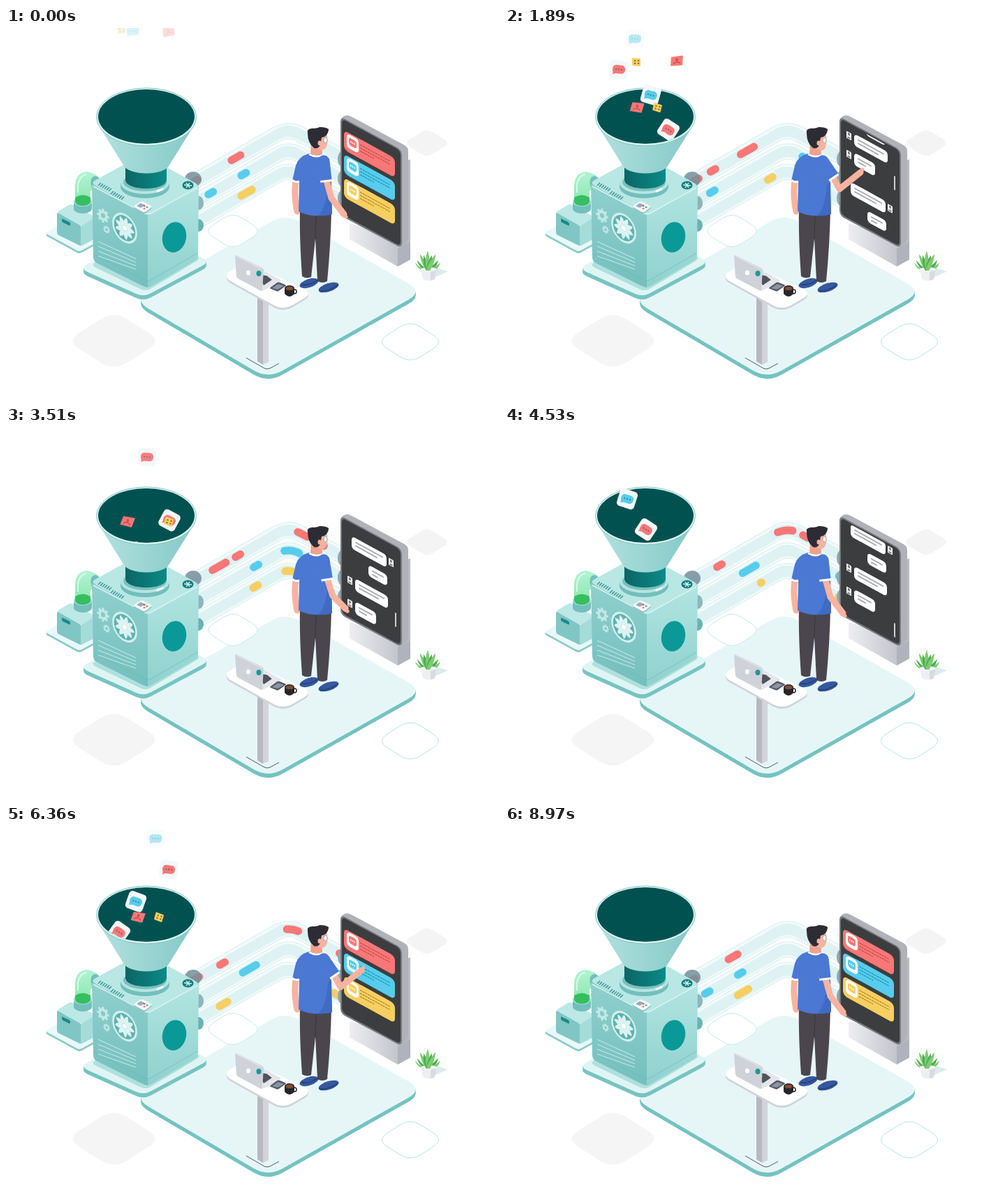
Recreate the animation shown at these times as an HTML page. Size 706 by 532 pixels, loop 9 s.

```html
<!DOCTYPE html>
<html lang="en">
<head>
<meta charset="utf-8">
<title>Message machine</title>
<style>
html, body { margin: 0; width: 100%; height: 100%; overflow: hidden; background: #fff; }
svg { display: block; width: 100vw; height: 100vh; }
</style>
</head>
<body>
<svg id="stage" viewBox="0 0 706 532" fill="none"></svg>
<script>
const LOOP = 9;
const RED = '#f97776', BLUE = '#56cdec', YELLOW = '#f6cf60', SKIN = '#f7b3a0', SHIRT = '#4a78d3';

// ---------- shape helpers ----------
const points = s => s.split(' ').map(p => p.split(',').map(Number));

function rounded(pts, r) {
  const toward = (a, b) => {
    const d = Math.hypot(b[0] - a[0], b[1] - a[1]), k = Math.min(r, d / 2) / d;
    return [a[0] + (b[0] - a[0]) * k, a[1] + (b[1] - a[1]) * k].map(n => n.toFixed(1));
  };
  const n = pts.length;
  return pts.map((p, i) =>
    `${i ? 'L' : 'M'}${toward(p, pts[(i + n - 1) % n])}Q${p} ${toward(p, pts[(i + 1) % n])}`).join('') + 'Z';
}
const path = (d, fill, more = '') => `<path d="${d}" fill="${fill}" ${more}/>`;
const line = (d, color, width, more = '') => path(d, 'none', `stroke="${color}" stroke-width="${width}" ${more}`);
const poly = (s, fill, r = 1, more) => path(rounded(points(s), r), fill, more);
const oval = (x, y, rx, ry, fill, more = '') =>
  `<ellipse cx="${x}" cy="${y}" rx="${rx}" ry="${ry}" fill="${fill}" ${more}/>`;
const rect = (x, y, w, h, r, fill) =>
  `<rect x="${x}" y="${y}" width="${w}" height="${h}" rx="${r}" fill="${fill}"/>`;
const tile = (x, y, w, h, r, fill, more) =>
  poly(`${x - w},${y} ${x},${y - h} ${x + w},${y} ${x},${y + h}`, fill, r, more);
const group = (inner, more = '') => `<g ${more}>${inner}</g>`;
const repeat = (n, f) => Array.from({ length: n }, (_, i) => f(i)).join('');
const slab = (s, r, h, top, side) =>
  repeat(h, i => poly(s, side, r, `transform="translate(0 ${h - i})"`)) + poly(s, top, r);
const gradient = (id, from, to, dir = 'x2="1" y2="0"') =>
  `<linearGradient id="${id}" ${dir}><stop stop-color="${from}"/><stop offset="1" stop-color="${to}"/></linearGradient>`;

// ---------- static scenery ----------
const defs = `<defs>
  ${gradient('cone', '#b2e1de', '#84c9c7')}
  ${gradient('left', '#8fd0cd', '#74bfbd', 'x2="0" y2="1"')}
  ${gradient('right', '#b2e5e1', '#8fd1ce', 'x2="0" y2="1"')}
  ${gradient('glass', '#a9f3cf', '#7ee2a2', 'x2="0" y2="1"')}
  ${gradient('stand', '#eeeef1', '#b9bbc3')}
  ${gradient('neck', '#0b6564', '#0b8a87')}
  <clipPath id="mouth"><path d="M100-20H310V127H270A69 39 0 0 1 132 127H100Z"/></clipPath>
  <clipPath id="panel"><rect x="1" y="1" width="81" height="129" rx="6"/></clipPath>
</defs>`;

const ground =
  tile(154.5, 448.5, 68, 43, 22, '#f5f5f5') + tile(603, 165, 33, 21, 10, '#f4f4f4') +
  slab('183,390 400,266 597,378 375,503', 24, 6, '#e6f6f7', '#74c3c0') +
  tile(325, 291, 42, 27, 16, '#fff', 'stroke="#c5eae9"') +
  tile(579, 450, 48, 31, 18, '#fff', 'stroke="#b4e6e1"');

const pipePaths = [
  'M265 223L385 154Q403 143 421 152L486 187',
  'M265 253L388 182Q402 173.500 417 179.500L486 218',
  'M265 282L388 211Q403 202.500 418 210L486 249'];
const pipes = pipePaths.map(d =>
  line(d, '#d9f0f1', 23) + line(d, '#f1fafa', 21) + line(d, '#def2f3', 16) +
  line(d, '#f6fcfc', 1.5, 'transform="translate(0 -9)"')).join('');
const mouths = oval(268, 217, 12, 11, '#758e9b', 'opacity=".85"') +
  oval(276, 251, 7, 10, '#8eb5bb') + oval(276, 283, 7, 9, '#68b3b2') +
  [188, 216, 244].map(y => oval(481, y, 6, 11, '#8fa9b2')).join('');

const gear = (x, y, r) => group(
  `<circle r="${r * .62}" stroke="#c1e9e6" stroke-width="${r * .45}"/>` +
  repeat(8, i => `<path d="M0 ${-r * .7}V${-r * 1.1}" stroke="#c1e9e6" stroke-width="${r * .38}" transform="rotate(${i * 45})"/>`),
  `transform="matrix(.87 .3 0 1 ${x} ${y})"`);

const sideBox =
  slab('56,294 92,273 143,300 105,321', 4, 3, '#e9f8f8', '#8acac8') +
  poly('73,264 108,284 108,313 73,296', '#80c6c4', 3) +
  poly('107,284 126,272 126,303 107,313', '#a3dcd8', 2) +
  poly('73,264 93,252 128,271 108,284', '#bce8e5', 3) +
  poly('80,273 92,279 92,284 80,278', '#1a8a88', 2) +
  path('M97 248V259A13 7 0 0 0 123 259V248Z', '#72bfbc') + oval(110, 249, 13, 7, '#a5ddda') +
  path('M99 248V226Q100 207 116 206Q127 207 137 218L126 235Q121 230 121 236V248A11 6 0 0 1 99 248Z', 'url(#glass)', 'opacity=".9"') +
  path('M99 243Q110 236 121 243V249A11 6 0 0 1 99 249Z', '#35bf60') +
  line('M103 236V225Q105 212 115 210', '#e4fcf0', 2, 'opacity=".8"') +
  oval(130, 225, 8, 13, '#74bebc', 'transform="rotate(-18 130 225)"');

const machine =
  slab('106,345 200,291 292,335 197,386', 12, 6, '#dff5f4', '#77c4c1') +
  poly('121,340 200,295 280,330 200,378', '#aee0dd', 8) +
  path('M123 224L204 265V372Q200 372 194 369L130 337Q125 334 125 329Z', 'url(#left)') +
  path('M203 265L276 225L275 326Q275 331 270 334L210 369Q206 372 203 371Z', 'url(#right)') +
  poly('121,222 196,181 278,226 204,269', '#b9e7e4', 8) +
  line('M125 227L199 266Q204 268 209 265L274 229', '#d9f3f1', 1.5) +
  line('M126 324L200 362Q204 364 208 361L274 323', '#6cbab8', 1, 'opacity=".7"') +
  repeat(4, i => line(`M132 ${306 + i * 7}L186 ${331 + i * 5}`, '#bfe6e4', 1.2)) +
  [[132, 226], [150, 238]].map(([x, y]) =>
    repeat(6, i => line(`M${x + i * 3} ${y + i * 1.6}l4 -4`, '#3a9694', 1.5))).join('') +
  gear(139, 269, 9) + gear(144, 289, 5) +
  slab('182,256 194,248 210,256 198,265', 3, 2, '#f5f8fa', '#95bec4') +
  poly('187,255 193,251 199,254 193,258', '#95aebc') +
  oval(198, 259, 1.5, 1.2, RED) + oval(202, 257, 1.5, 1.2, '#40bd76') + oval(198, 255, 1.5, 1.2, '#ef5258') +
  oval(260.500, 225.500, 8, 6, '#167f7f') + line('M255 225l11 1M258 222l5 7M263 222l-5 7', '#d2efed', 1.3) +
  oval(241, 300, 17, 22, '#0a9997', 'transform="rotate(12 241 300)"');

const hopper =
  path('M164 222V228A35 16 0 0 0 234 228V222Z', '#73bfbd') + oval(199, 222, 35, 16, '#b6e4e1') +
  oval(199, 221, 31, 13, '#79c0be') + path('M171 195V218A29 12 0 0 0 230 218V195Z', 'url(#neck)') +
  line('M217 234l7 -3', '#eefafa', 3, 'stroke-linecap="round"') +
  path('M131 137L169 198A33 14 0 0 0 233 198L271 137Z', 'url(#cone)') +
  oval(201, 127.500, 71.500, 41.500, '#d8f1ef', 'stroke="#73bebb" stroke-width=".8"') +
  oval(201, 127, 69, 39, '#025151');

const kiosk =
  poly('492,280 566,300 567,195 579,188 579,332 561,342 492,303', 'url(#stand)') +
  poly('561,316 579,306 579,332 561,342', '#b1b3bc') +
  poly('479,129 489,124 576,171 576,306 566,314 500,260', '#b0b2b8', 6) +
  poly('479,127 567,175 567,316 479,269', '#77797f', 8) +
  poly('481,130 565,176 565,313 481,267', '#3c3d3f', 7);

const manBody =
  oval(434, 366, 14, 6, '#35589e', 'transform="rotate(-18 434 366)"') +
  oval(462, 372, 15, 6, '#35589e', 'transform="rotate(-18 462 372)"') +
  line('M423 368q12 2 24 -7M449 377q14 1 27 -9', '#233c78', 1.5) +
  path('M421 258Q420 300 424 356Q430 360 437 357L443 302L446 363Q453 367 460 363Q465 310 466 262Z', '#4b464e') +
  line('M443 303L444 270', '#39353d', 1) +
  line('M416 216Q411 235 417 263', SKIN, 9, 'stroke-linecap="round"') +
  path('M434 180Q419 184 415 197L410 219Q414 223 420 221L419 263Q441 274 467 266L465 215Q466 190 453 181Z', SHIRT) +
  path('M447 269Q459 258 461 225L466 220L467 267Q458 270 447 269Z', '#3f6bc3') +
  line('M410 218Q414 222 420 220', '#fff', 3) +
  path('M437 164H452L453 181Q444 186 436 181Z', '#eea18f') +
  line('M434 181Q444 187 454 182', '#fff', 2.5) +
  path('M446 150H459Q462 162 459 170Q455 178 446 173Z', SKIN) +
  path('M432 151Q430 145 438 144Q446 144 449 142Q458 142 462 145Q462 152 456 156L452 157L450 168Q447 174 441 172Q432 165 432 151Z', '#2d2c34') +
  oval(449, 165, 2.5, 3.5, SKIN) + oval(457.500, 161, 2.500, 4, '#fff', 'stroke="#8c91a6" stroke-width=".8"');

const table =
  line('M344 473L370 488Q374 490 378 488L391 481', '#55595f', 1) +
  poly('360,386 368,390 368,483 360,478', '#b7b8c0', 0.5) + poly('368,386 376,386 376,479 368,483', '#d3d4d9', 0.5) +
  slab('309,356 343,336 440,380 397,405', 16, 3, '#fff', '#d0d3d9') +
  poly('338,358 366,346 395,362 368,377', '#e4e6eb', 2) + poly('361,354 373,355 381,361 369,369', '#50545c') +
  poly('328,325 369,345 367,378 330,358', '#cfd2d8', 3) + line('M330 327L367 346', '#eceef1', 1) +
  oval(347, 351, 3, 3.5, '#fff') + oval(362, 352, 3.5, 4, '#159b99') +
  poly('377,373 390,364 402,369 389,378', '#555c68', 2) + poly('381,373 390,367 398,370 389,375', '#8c93a1') +
  oval(413, 378, 3, 3, 'none', 'stroke="#25262a" stroke-width="1.5"') +
  path('M399 373V381Q406 389 413 381V373Z', '#25262a') + oval(406, 373, 7, 4, '#33343a') + oval(406, 373.500, 5, 2.5, '#8b4c2a');

const leaf = i => {
  const a = (i - 4) * .29, x = 604 + Math.sin(a) * 20, y = 347 - Math.cos(a) * (i % 2 ? 22 : 27);
  return path(`M602 348Q${(600 + x) / 2 - 3} ${y + 12} ${x} ${y}Q${(608 + x) / 2 + 2} ${y + 14} 607 348Z`, i % 2 ? '#4cae55' : '#7fcb70');
};
const plant = path('M606 361L633 349L617 344Z', '#dcebeb') + repeat(9, leaf) +
  path('M594 346L597 360Q606 365 614 360L617 346Z', '#eeeff2') + path('M608 348L608 362Q612 362 614 360L617 346Z', '#d9dbe2') +
  oval(605.500, 346, 11.500, 3, '#f8f8fa') + repeat(5, i => leaf(i + 2));

// ---------- touch screen ----------
const menuCard = (color, ink, v) =>
  rect(3, v, 73, 28, 6, color) + rect(7, v + 2, 17, 20, 5, '#fff') +
  rect(10, v + 6, 11, 11, 3, color) + line(`M12 ${v + 11.500}h7`, '#fff', 2, 'stroke-dasharray="1.500 1.200"') +
  [43, 43, 20].map((w, i) => line(`M26 ${v + 8 + i * 4.500}h${w}`, ink, 1.4, 'stroke-dasharray="3 .6"')).join('');
const menu = menuCard(RED, '#c14e50', 14) + menuCard(BLUE, '#2893b3', 48) + menuCard(YELLOW, '#b68b2b', 82);

const bubble = (u, v, w, h, avatar) =>
  rect(u, v, w, h, 5, '#fff') +
  [w - 12, w - 20].map((n, i) => line(`M${u + 6} ${v + 6 + i * 5}h${n}`, '#a7a7aa', 2, 'stroke-linecap="round"')).join('') +
  (avatar ? rect(avatar, v + 2, 7, 10, 1, '#f2f2f2') + oval(avatar + 3.500, v + 5, 1.500, 2, '#77777b') +
    line(`M${avatar + 1.500} ${v + 10}h4`, '#77777b', 2) : '');
const chat = bubble(36, -11, 28, 14) + bubble(19, 10, 48, 17, 8) + bubble(19, 37, 30, 18, 8) +
  bubble(14, 82, 50, 18, 67) + bubble(38, 110, 27, 16) + bubble(19, 140, 47, 18, 8) + bubble(19, 173, 30, 18, 8);

// ---------- moving parts ----------
// entry time in seconds, dash length
const flows = [
  { color: RED, speed: 107, lead: 3.5, pills: [[1.04, 22], [1.57, 8], [1.86, 15], [2.82, 8], [3.11, 22], [4.11, 8], [4.85, 17], [5.91, 8], [6.37, 22], [8.34, 15], [8.97, 8]] },
  { color: BLUE, speed: 136, lead: 8, pills: [[.53, 22], [1.68, 8], [2.36, 22], [2.78, 8], [3.87, 22], [4.9, 8], [5.71, 22], [6.65, 22], [7.04, 8], [8.42, 8], [8.82, 8]] },
  { color: YELLOW, speed: 136, lead: 12.7, pills: [[.12, 1.5], [1.01, 8], [2.42, 13], [2.82, 8], [3.76, 1.5], [4.7, 13], [6.06, 13], [6.84, 8], [7.13, 8], [8.42, 18]] }];

// kind, colour, x, time at the top edge, optional speed and sideways drift
const drops = [
  ['card', BLUE, 182, -.04, 102, -7], ['chip', YELLOW, 165, -.02], ['chip', RED, 233, -.04],
  ['card', RED, 234, .46], ['card', BLUE, 215, .88, 95, -7], ['chip', RED, 189, 1], ['chip', YELLOW, 218, 1],
  ['card', RED, 163, 1.31], ['chip', YELLOW, 188, 1.51], ['chip', RED, 246, 1.52],
  ['card', BLUE, 186, 1.74], ['card', RED, 234, 2.2], ['chip', YELLOW, 233, 2.45], ['chip', RED, 174, 2.45],
  ['card', RED, 202, 3.09], ['card', BLUE, 175, 3.52],
  ['card', RED, 162, 4.87], ['card', BLUE, 186, 5.3], ['chip', RED, 189, 5.34], ['chip', YELLOW, 219, 5.34],
  ['card', RED, 233, 5.75], ['card', BLUE, 215, 6.14, 81, -4], ['chip', YELLOW, 188, 6.46], ['chip', RED, 246, 6.46],
  ['card', RED, 235, 6.73], ['card', RED, 233, 7.14], ['card', BLUE, 213, 7.11], ['chip', YELLOW, 164, 7.4], ['chip', RED, 233, 7.4]];
const dropShape = {
  card: c => rect(-13, -13, 26, 26, 5, '#f4f8fa') + rect(-9, -6, 18, 12, 5, c) + path('M-8 2v6l6 -3Z', c) +
    [-4, 0, 4].map(x => oval(x, 0, 1.1, 1.1, '#31566a', 'opacity=".65"')).join(''),
  chip: c => c === RED
    ? poly('-8,-6 9,-8 8,6 -9,7', c, 1) + oval(0, -2, 2, 2, '#c94f55') + line('M-5 4Q0 -1 5 3', '#c94f55', 1.5)
    : poly('-6,-6 6,-5 6,6 -6,5', c, 1) + line('M-3 -2h2M2 -2h2M-3 2h2M2 2h2', '#80651f', 2)
};

const stage = document.getElementById('stage');
stage.innerHTML = defs + ground + pipes +
  flows.map((f, i) => f.pills.map(() => line(pipePaths[i], f.color, 11, 'class="pill" stroke-linecap="round"')).join('')).join('') +
  mouths + sideBox + machine +
  group(`<circle r="19" fill="#5fb3b1" stroke="#d3efed" stroke-width="3"/>` +
    group(repeat(9, i => `<path d="M0 -3Q8 -7 3 -16Q-2 -13 -3 -5Z" fill="#dcf3f2" transform="rotate(${i * 40})"/>`) +
      `<circle r="3.5" fill="#fff"/>`, 'id="fan"'), 'transform="matrix(.87 .4 0 1 170 287)"') +
  hopper +
  group(drops.map(d => group(dropShape[d[0]](d[1]), 'class="drop"')).join(''), 'clip-path="url(#mouth)"') +
  kiosk +
  group(group(menu, 'id="menu"') + group(group(chat, 'id="messages"') + '<path id="bar" d="M77 39v20" stroke="#fff" stroke-width="1.500"/>', 'id="chat"'),
    'transform="matrix(1 .55 0 1 481 131)" clip-path="url(#panel)"') +
  plant + manBody + group('', 'id="arm"') + table;

const $ = id => document.getElementById(id);
const [fan, menuView, chatView, messages, bar, arm] = ['fan', 'menu', 'chat', 'messages', 'bar', 'arm'].map($);
const pillNodes = stage.querySelectorAll('.pill'), dropNodes = stage.querySelectorAll('.drop');

const clamp = x => Math.max(0, Math.min(1, x));
const ramp = (t, a, b) => { const k = clamp((t - a) / (b - a)); return k * k * (3 - 2 * k); };

// cuff, elbow, hand
const pose = {
  down: [458, 218, 466, 244, 484, 267],
  tap: [474, 207, 494, 206, 510, 175],
  point: [470, 213, 479, 231, 509, 207],
  swipe: [473, 209, 487, 218, 510, 187]
};
const gestures = [[0, 'down'], [.3, 'down'], [.9, 'tap'], [1.2, 'tap'], [1.7, 'point'], [2.6, 'point'], [3.1, 'swipe'], [3.6, 'down'],
  [5.5, 'down'], [6.1, 'point'], [7.5, 'point'], [7.9, 'swipe'], [8.4, 'down'], [LOOP, 'down']];

function drawArm(t) {
  const i = gestures.findIndex(g => g[0] > t), [t0, a] = gestures[i - 1], [t1, b] = gestures[i];
  const k = ramp(t, t0, t1);
  const [cx, cy, ex, ey, hx, hy] = pose[a].map((v, j) => v + (pose[b][j] - v) * k);
  const d = Math.hypot(cx - 455, cy - 191), ux = (cx - 455) / d, uy = (cy - 191) / d;
  const round = 'stroke-linecap="round" stroke-linejoin="round"';
  arm.innerHTML =
    line(`M${cx - ux * 5} ${cy - uy * 5}L${ex} ${ey}L${hx} ${hy}`, SKIN, 9, round) +
    line(`M${hx - 2} ${hy + 1}L${hx + 3} ${hy + (hy > 240 ? 4 : -4)}`, SKIN, 5, round) +
    line(`M455 191L${cx + ux * 3} ${cy + uy * 3}`, '#fff', 16) +
    line(`M455 191L${cx} ${cy}`, SHIRT, 17) + oval(455, 191, 8.5, 8.5, SHIRT);
}

function render(t) {
  let n = 0;
  for (const { speed, lead, pills } of flows)
    for (const [enter, dash] of pills) {
      const age = (t - enter + .3 + LOOP) % LOOP - .3;
      const start = age * speed + lead - dash / 2;
      const node = pillNodes[n++];
      node.setAttribute('stroke-dasharray', `${dash} 3000`);
      node.setAttribute('stroke-dashoffset', -start);
      node.setAttribute('visibility', start > -dash && start < 280 ? 'visible' : 'hidden');
    }

  drops.forEach(([kind, , x, enter, speed = kind === 'card' ? 102 : 128, drift = 0], i) => {
    const y = (t - enter) * speed, node = dropNodes[i];
    const turn = kind === 'card' ? y * .05 + y * y * .0012 : y * .2 - 10;
    node.setAttribute('visibility', y >= 0 && y < 200 ? 'visible' : 'hidden');
    node.setAttribute('opacity', clamp(.15 + y / 55));
    node.setAttribute('transform', `translate(${x + drift * y / 107} ${y}) rotate(${turn})`);
  });

  fan.setAttribute('transform', `rotate(${t * 240})`);

  const chatOn = ramp(t, 1.3, 1.5) - ramp(t, 5, 5.2) + ramp(t, 6.65, 6.85) - ramp(t, 8.55, 8.75);
  const scroll = t < 5.5 ? ramp(t, 2.6, 3.9) : ramp(t, 7.5, 8.3);
  menuView.setAttribute('opacity', 1 - chatOn);
  chatView.setAttribute('opacity', chatOn);
  messages.setAttribute('transform', `translate(0 ${-82 * scroll})`);
  bar.setAttribute('transform', `translate(0 ${69 * scroll})`);
  drawArm(t);
}

const begin = performance.now();
function tick() {
  render((performance.now() - begin) / 1000 % LOOP);
  requestAnimationFrame(tick);
}
tick();
</script>
</body>
</html>
```
